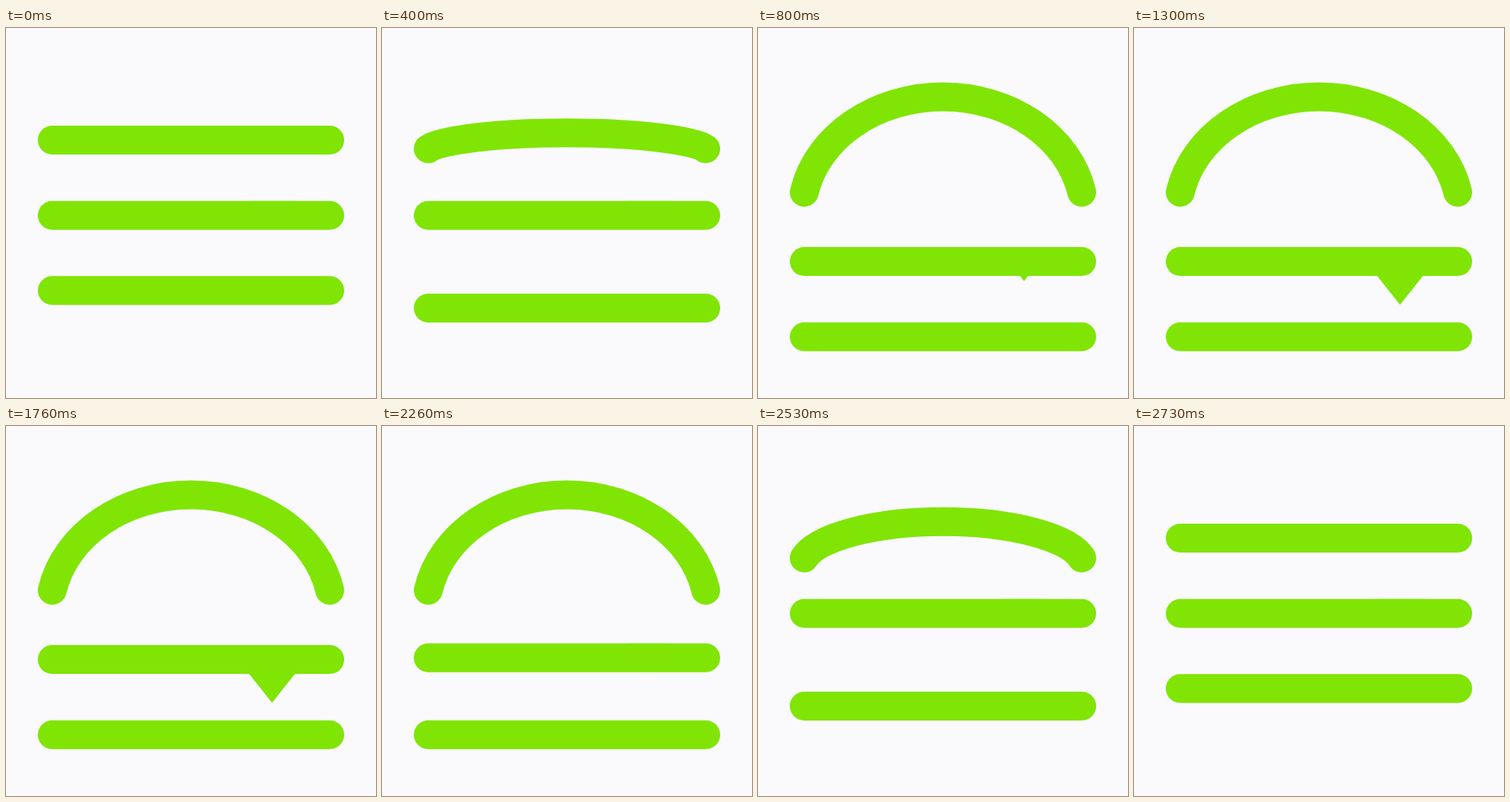
An HTML page for the animation above (3500 ms loop, 500 by 500 pixels).

```html
<!DOCTYPE html>
<html lang="en">
<head>
<meta charset="utf-8">
<title>Menu to burger</title>
<style>
  html, body { margin: 0; width: 100%; height: 100%; overflow: hidden; background: #fafafd; }
  svg { display: block; width: 100%; height: 100%; }
  path { fill: none; stroke: #80e505; stroke-width: 39; stroke-linecap: round; }
  #cheese { fill: #80e505; stroke: none; }
</style>
</head>
<body>
<svg viewBox="0 0 500 500">
  <path id="bun"/>
  <path id="patty" d="M62.5 0H437.5"/>
  <path id="cheese" d="M328.5 -19.5H390.5L359.5 19.5Z"/>
  <path id="base" d="M62.5 0H437.5"/>
</svg>
<script>
const LOOP = 3500, FRAME = 1000 / 30;

function bezier(x1, y1, x2, y2) {
  const at = (a, b, u) => 3 * (1 - u) * (1 - u) * u * a + 3 * (1 - u) * u * u * b + u * u * u;
  return x => {
    if (x <= 0) return 0;
    if (x >= 1) return 1;
    let low = 0, high = 1;
    for (let i = 0; i < 24; i++) {
      const mid = (low + high) / 2;
      if (at(x1, x2, mid) < x) low = mid; else high = mid;
    }
    return at(y1, y2, low);
  };
}

const swift = bezier(.33, .15, .6, 1);
const inOut = bezier(.58, 0, .6, 1);
const settle = bezier(.25, .1, .35, 1);

// Each part: opening [start, end, easing], closing [start, end, easing]
const parts = {
  bun:    [[300, 583, inOut], [2400, 2733, settle]],
  base:   [[300, 583, swift], [2400, 2733, settle]],
  patty:  [[467, 750, swift], [2250, 2520, swift]],
  cheese: [[733, 1060, swift], [2000, 2250, swift]]
};

const node = id => document.getElementById(id);
const mix = (a, b, p) => a + (b - a) * p;
const run = ([start, end, ease], t) => ease((t - start) / (end - start));
const openness = (id, t) => run(parts[id][0], t) - run(parts[id][1], t);
const moveTo = (id, y) => node(id).setAttribute('transform', `translate(0 ${y})`);

function bunPath(p) {
  const end = mix(151.5, 222, p), side = mix(151.5, 147, p), top = mix(151.5, 93, p);
  return `M62.5 ${end}C80.2 ${side} 158.8 ${top} 250 ${top}S419.8 ${side} 437.5 ${end}`;
}

function draw(t) {
  const pattyY = mix(253.25, 315.6, openness('patty', t));
  node('bun').setAttribute('d', bunPath(openness('bun', t)));
  moveTo('patty', pattyY);
  moveTo('cheese', pattyY + 39 * openness('cheese', t));
  moveTo('base', mix(354.75, 417.3, openness('base', t)));
}

const origin = performance.now();
function tick(now) {
  const t = Math.max(0, now - origin) % LOOP;
  draw(Math.floor((t + 7) / FRAME) * FRAME);
  requestAnimationFrame(tick);
}
draw(0);
requestAnimationFrame(tick);
</script>
</body>
</html>
```
